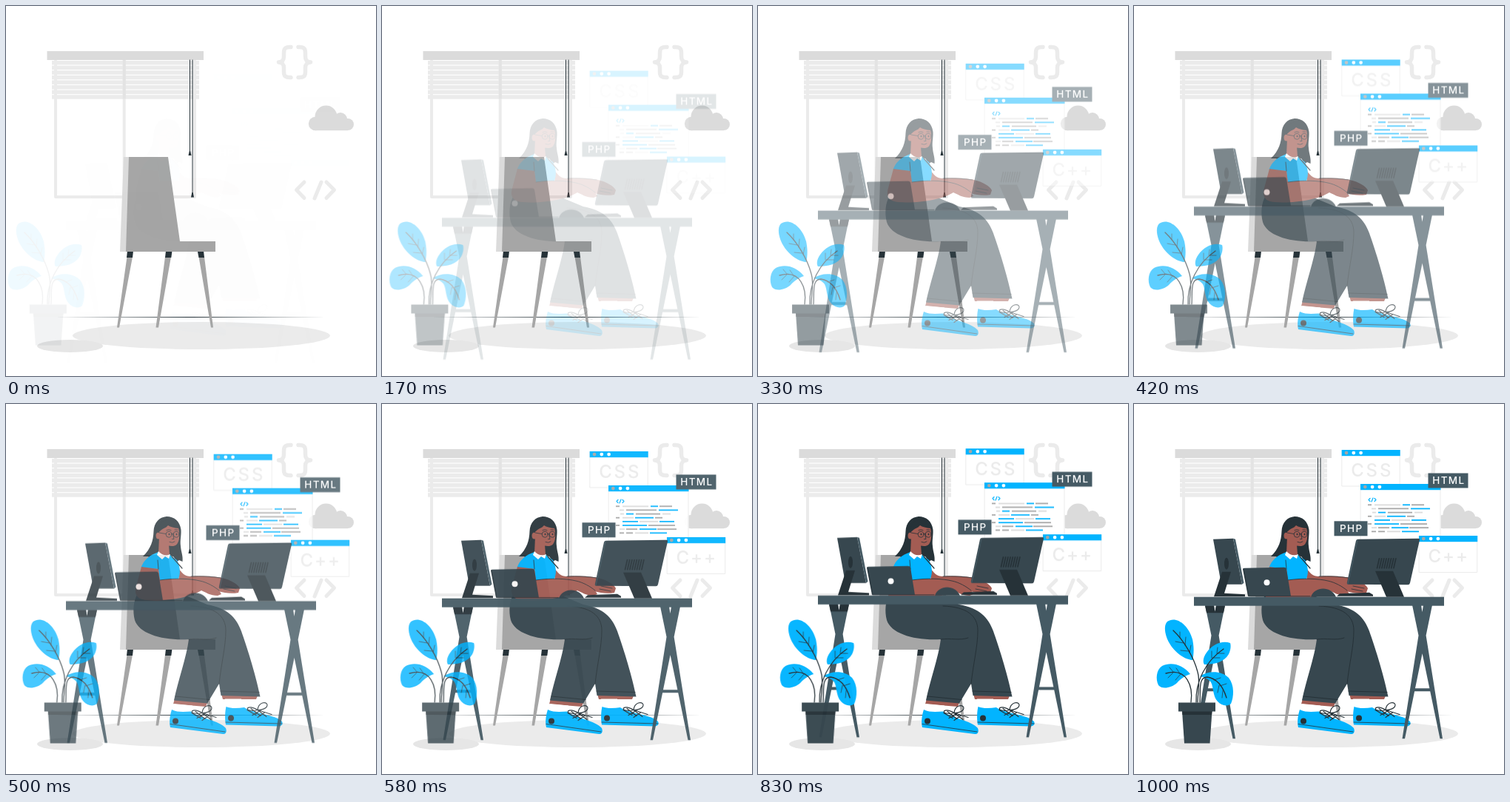
An HTML page with a canvas for the animation above (1.04 s loop, 500 by 500 pixels).

```html
<!DOCTYPE html>
<html lang="en">
<head>
<meta charset="utf-8">
<title>Developer at a desk</title>
<style>
  html, body { margin: 0; width: 100%; height: 100%; overflow: hidden; background: #fff; }
  canvas { display: block; width: 500px; height: 500px; }
</style>
</head>
<body>
<canvas id="stage"></canvas>
<script>
const SIZE = 500, LOOP = 1040, FPS = 24, SHIFT = 30;
const BLUE = '#02b4ff', INK = '#263238', DARK = '#37474f', SLATE = '#455a64';
const GREY = '#a6a6a6', MID = '#dbdbdb', PALE = '#ebebeb', SKIN = '#a35c53', WHITE = '#fff';
const scale = window.devicePixelRatio || 1;

let g; // context being drawn into

function prepare(canvas) {
  canvas.width = canvas.height = SIZE * scale;
  const ctx = canvas.getContext('2d');
  ctx.scale(scale, scale);
  return ctx;
}

function layer(draw) {
  const canvas = document.createElement('canvas');
  g = prepare(canvas);
  g.lineCap = g.lineJoin = 'round';
  draw();
  return canvas;
}

function fill(color, path) {
  g.fillStyle = color;
  g.fill(new Path2D(path));
}

function line(color, width, path) {
  g.strokeStyle = color;
  g.lineWidth = width;
  g.stroke(new Path2D(path));
}

function box(color, x, y, w, h) {
  g.fillStyle = color;
  g.fillRect(x, y, w, h);
}

function oval(color, x, y, rx, ry = rx) {
  g.fillStyle = color;
  g.beginPath();
  g.ellipse(x, y, rx, ry, 0, 0, Math.PI * 2);
  g.fill();
}

function label(text, x, y, size, color, spacing) {
  g.font = `500 ${size}px Inter, Roboto, sans-serif`;
  g.letterSpacing = spacing + 'px';
  g.textAlign = 'center';
  g.fillStyle = color;
  g.fillText(text, x + spacing / 2, y);
}

function drawRoom() {
  // window and blind
  line(PALE, 4, 'M67 74V258H255V74M159.7 74V258');
  for (let i = 0; i < 8; i++) {
    box(PALE, 62, 74 + i * 6.6, 199, 5.5);
  }
  box('#e3e3e3', 157.7, 73, 4, 52.5);
  box(MID, 55.5, 61, 211.5, 12);
  line(INK, 1, 'M248.5 73V198M252 73V254');
  fill(INK, 'M247.8 196H249.2L250.5 202H246.5ZM251.3 252H252.7L254 258.5H250Z');

  // wall icons
  const brace = 'M385 55.5C378 55 375.5 57 375.5 63V68C375.5 73 374 75.5 368.5 76C374 76.5 375.5 79 375.5 84V89C375.5 95 378 97 385 96.5';
  line(PALE, 5.5, brace);
  g.save();
  g.translate(780, 0);
  g.scale(-1, 1);
  line(PALE, 5.5, brace);
  g.restore();
  oval(MID, 418, 159, 9.2);
  oval(MID, 432.5, 149.5, 15);
  oval(MID, 452, 153, 9);
  oval(MID, 462, 160, 8);
  box(MID, 418, 152, 44, 16.2);
  line(PALE, 5, 'M403 238L392.5 248.5L403 259.5M426 238L417 260M433 238L443.5 248.5L433 259.5');

  // floor
  oval(PALE, 264, 445.5, 174, 18.5);
  oval('#e6e6e6', 86.5, 459.5, 44.5, 8.5);
  fill(INK, 'M66 420.5L249 420L432 420.5L249 421Z');

  // chair
  fill(GREY, 'M163.5 339H171L153 434.5H150ZM215 339H223L206 434.5H202.5ZM260.5 339H268L280 434.5H277Z');
  fill(INK, 'M164 331H172L171 340H163ZM216 331H224.5L223.3 340H215ZM258.8 331H267L268 340H260.5Z');
  fill(MID, 'M159 204H167L163 332H154Z');
  fill(GREY, 'M166 204H219L235 318H283V332H162Z');
}

function drawHair() {
  fill(INK, 'M217 152C227 152 235 158 236.5 170C237 178 235 184 236 192C236.5 200 239.5 205 238.5 213L234 211L231 213L226 206L200 203L196 209L192 206L185 206C196 195 199 185 199.5 172C200 160 207 153 217 152Z');
}

function drawFace() {
  fill(SKIN, 'M207 180L206 201C210 208 217 208 221 203L220 190Z');
  fill(SKIN, 'M207 168C211 162 226 161 232.5 166C235.5 176 234.5 185 231 189.5C227 193.5 220 192 216 190L207 183Z');
  oval(SKIN, 206, 178, 3.4, 4.6);
  line(INK, 0.8, 'M216 175.5L207 174M223.5 175.5Q225 174.5 226.5 175.5M225.5 176L227 182.5H224.5M221 186.5Q225 188.5 228 186M217 170.5Q220 169 223 170.5M228 170L232 170');
  g.strokeStyle = INK;
  for (const x of [220, 230]) {
    g.beginPath();
    g.ellipse(x, 176.2, 3.8, 4, 0, 0, Math.PI * 2);
    g.stroke();
    oval(INK, x + 0.5, 176, 0.9, 1.2);
  }
}

function drawShoe(x, y, body, sole) {
  fill(BLUE, body);
  line(INK, 0.8, sole);
  oval(INK, x, y, 4);
  // laces
  g.save();
  g.translate(x, y);
  line(INK, 1.2, 'M22 -11L34 -4M27 -13L40 -3M29 -4L41 -11M36 -1L46 -8M36 -11C25 -18 19 -13 24 -11Q30 -9 36 -11C37 -22 48 -23 49 -18C49 -13 42 -11 36 -11L48 -2M36 -11L55 -5');
  g.restore();
}

function drawPerson() {
  drawHair();
  // far arm
  fill(SKIN, 'M231 218C237 229 242 233 250 233C266 232 282 233 292 235C304 238 313 243 316 249L314 255C303 257 296 255 286 253L260 248L234 240Z');
  // ankles, socks, shoes
  fill(SKIN, 'M228 398L273 401L270 409L226 405.5ZM291 392H341L338 399H293Z');
  fill(WHITE, 'M226.5 405L252 407.5L249 419L224 416ZM296 398.5H318V413H296Z');
  drawShoe(229, 428.5,
    'M224 413C232 417 241 416 250 415.5C260 424 289 428 297 438C299 443 297 446.5 293 446L222 437C220 428 222 419 224 413Z',
    'M222 432.5L296 443');
  drawShoe(304, 424.5,
    'M297.5 409C305 412 314 411 322 410C333 418 365 420 373 429C375 433 372 435.5 368 435.5L297 433.5C295.5 425 296 415 297.5 409Z',
    'M297 430L373 432');
  // trousers
  fill(DARK, 'M178 256C172 266 171 280 174 292C180 311 213 320 247 318C244 342 232 375 227 400.5L272 404.5L288 378L290.5 394L343.5 395.5C336 360 325 327 318 307C311 288 299 276 272 271L236 256Z');
  line(INK, 1, 'M250 273C282 274 297 286 297 306C297 328 291 350 288 378M247 318C260 316 273 320 284 316M229 395L275 399.5M290 388L342 389.5');
  // shirt and near arm
  fill(BLUE, 'M206 200L220 203L231 211C235 219 237 229 232 238L208 240L206 223L182.5 221C186 211 194 204 206 200Z');
  fill(SKIN, 'M183 220L206 223L208 238C228 235 250 236 262 239C272 241 281 246 288 252L291 257L286 259C276 259 271 255 264 252C248 262 215 267 190 265C176 264 173 256 176 246Z');
  line(INK, 0.8, 'M208 238C228 235 250 236 262 239C272 241 282 247 288 252M205 211L206 223M250 233Q272 232 290 235M296 246L311 249M294 250L309 253');
  line(INK, 1.2, 'M224 206L238 222');
  drawFace();
  fill(WHITE, 'M206 199L204 204L211 210L215 206L220 209L222 203Q213 207 206 199Z');
  // fringe
  fill(INK, 'M205 174C206 161 214 155 222 156C230 157 235 161 233.5 168C227 167.5 222 166 219 164C216 168 211 168 208 172Z');
}

function drawTrestle(x) {
  g.save();
  g.translate(x, 0);
  fill(SLATE, 'M-14 271H-2L27 451.5H23.5ZM1 271H13L-24 451.5H-27.5ZM-14 383.5H14V387.5H-14Z');
  g.restore();
}

function drawDesk() {
  g.translate(0, 0.7);
  drawTrestle(110);
  drawTrestle(390);
  fill(INK, 'M96 272H108L109.5 281.5H98ZM111 272H123L121 281.5H109Z');
  box(SLATE, 81, 260, 338, 12);

  // side screen
  fill(DARK, 'M107 182L134 181L146 243H118Z');
  fill(SLATE, 'M134 181L137 182L148.5 241L146 243Z');
  oval(INK, 125, 215, 3, 8);
  fill(INK, 'M119 226H131L122 255L150 256.5V259.5H108Z');

  // mouse and keyboard
  fill(DARK, 'M239 260C243 246 266 244 273 260Z');
  fill(INK, 'M274 259L278 255.5L318 254L323 257V259Z');

  // laptop
  fill(DARK, 'M147 222.5Q147 221 149 221L203 220Q205 220 206 222L212 259H154Z');
  line(INK, 0.8, 'M148 222L155 259H238');
  oval(WHITE, 179.5, 240.5, 4);

  // main screen
  fill(DARK, 'M303 182L384 181Q386.5 181 386 183L373 241Q372.5 243.5 370 243.5L290 243Q287 243 288 240L300 184Q300.5 182 303 182Z');
  line(SLATE, 1.4, 'M302 183L289 242');
  for (let i = 0; i < 8; i++) {
    line(INK, 1.6, `M${331.5 + i * 3.2} 208L${328.5 + i * 3.2} 221`);
  }
  fill(INK, 'M326 225H350L365 260H341Z');
}

function drawPanel(x, y, w, h) {
  box(WHITE, x, y, w, h);
  line(PALE, 1, `M${x + .5} ${y + .5}h${w - 1}v${h - 1}h${1 - w}Z`);
  box(BLUE, x, y, w, 8.2);
  [GREY, WHITE, WHITE].forEach((c, i) => oval(c, x + 6.3 + i * 9.8, y + 4.1, 2.4));
}

function drawPanels() {
  drawPanel(280.7, 62, 79, 49.5);
  label('CSS', 320.3, 97.8, 24, PALE, 2.8);

  drawPanel(306, 108, 108.5, 76);
  line(BLUE, 1.2, 'M319 127.5L317 129.5L319 131.5M323 127L321 132M325 127.5L327 129.5L325 131.5');
  const tint = { d: GREY, l: MID, b: BLUE };
  const rows = [
    'd316-321 l325-360 b363-373 d375-392',
    'l321-327 d330-371 b374-400',
    'l322-327 b330-340 d343-376 l379-390',
    'd316-321 l325-340 b342-367 d369-379',
    'b325-346 l348-373 b375-395',
    'd316-321 b325-358 d360-396',
    'l321-328 d330-345 b348-371 d372-398',
    'd321-327 d330-339 l342-360 b362-385'
  ];
  g.lineCap = 'butt';
  rows.forEach((row, i) => row.split(' ').forEach(part => {
    const [from, to] = part.slice(1).split('-');
    line(tint[part[0]], 1.8, `M${from} ${136.3 + i * 5.15}H${to}`);
  }));
  g.lineCap = 'round';

  drawPanel(385, 178, 79.2, 50);
  label('C++', 424.2, 213.5, 24, PALE, 2);

  box(SLATE, 397.5, 93.5, 54, 20);
  label('HTML', 424.7, 108.3, 13.5, WHITE, 1.4);
  box(SLATE, 270.5, 158.3, 45, 20);
  label('PHP', 293, 173.3, 13.5, WHITE, 1.4);
}

function drawPlant() {
  fill(BLUE, 'M45 294C56 286 73 297 79 318C82 332 80 342 79 346C66 345 50 332 44 315C41 306 41 298 45 294Z');
  fill(BLUE, 'M130 323C120 319 106 324 98 336C93 343 93 349 95 352C108 352 122 349 128 338C131 332 131 326 130 323Z');
  fill(BLUE, 'M76 365C66 352 50 348 38 354C30 359 29 372 33 380C38 386 50 384 58 377C64 370 70 367 76 365Z');
  fill(BLUE, 'M89 368C100 360 118 360 128 370C136 380 135 396 131 405C127 409 118 408 113 402C106 394 108 384 104 376C100 371 95 369 89 368Z');
  line(INK, 1.3, 'M86 403C86 390 90 375 86 362C81 343 68 320 53 306M84 403C83 376 96 348 121 331M77 403C80 382 72 356 43 364M89 403C90 385 87 369 99 369C113 371 121 384 125 397');
  line(INK, 0.7, 'M62 316L62 308M69 326L70 315M75 336L77 326M67 323L56 321M74 334L63 333M105 343L105 334M112 337L113 329M106 343L116 343M113 337L122 337M53 362L48 356M62 364L57 357M54 362L46 370M63 365L56 373M108 373L117 370M116 381L125 378M115 380L113 390M120 387L119 397');
  fill(DARK, 'M65 415H105.5L102.5 458.5H68Z');
  fill(INK, 'M65 415H105.5L105 420H65.5Z');
  box(DARK, 60, 403.5, 50, 12);
}

function bezier(x1, y1, x2, y2) {
  const at = (a, b, s) => 3 * (1 - s) * s * ((1 - s) * a + s * b) + s * s * s;
  return x => {
    if (x >= 1) return 1;
    let lo = 0, hi = 1;
    for (let i = 0; i < 24; i++) {
      const s = (lo + hi) / 2;
      if (at(x1, x2, s) < x) lo = s; else hi = s;
    }
    return at(y1, y2, lo);
  };
}

const rise = bezier(.36, -.01, .5, 1.38);
const glide = bezier(0, 0, .58, 1);

const room = layer(drawRoom);
const person = layer(drawPerson);
const panels = layer(drawPanels);
const desk = layer(drawDesk);
const plant = layer(drawPlant);
const view = prepare(document.getElementById('stage'));

function put(canvas, alpha, dx, dy) {
  view.globalAlpha = Math.min(1, Math.max(0, alpha));
  view.drawImage(canvas, dx, dy, SIZE, SIZE);
}

function render(ms) {
  const step = Math.min(FPS, Math.floor((ms % LOOP + 6) * FPS / 1000));
  const p = Math.min(1, (step + 0.9) / FPS);
  const up = rise(p), across = glide(p);
  const dy = SHIFT * (1 - up);
  view.globalAlpha = 1;
  view.fillStyle = WHITE;
  view.fillRect(0, 0, SIZE, SIZE);
  put(room, 1, 0, 0);
  put(panels, up, 0, dy);
  put(person, up, 0, 0);
  put(desk, up, 0, dy);
  put(plant, across, -SHIFT * (1 - across), 0);
}

const start = performance.now();
function tick() {
  render(performance.now() - start);
  requestAnimationFrame(tick);
}
tick();
</script>
</body>
</html>
```
